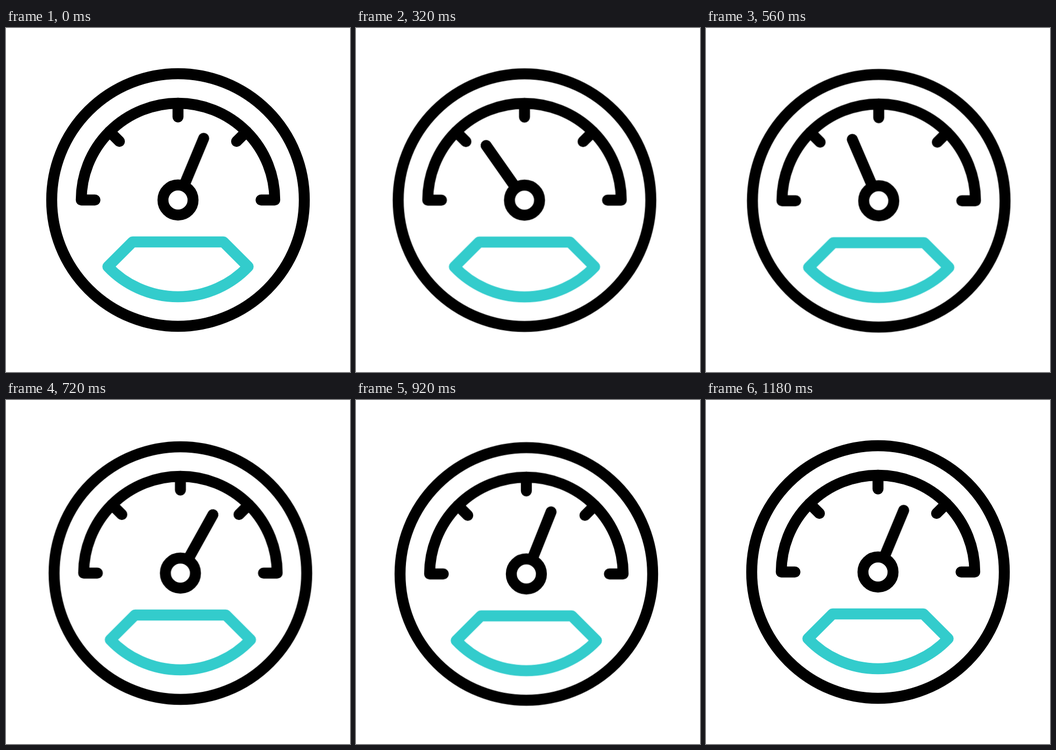
Recreate the animation shown at these times as an HTML page without scripts. Size 640 px wide and 640 px high, loop 1.2 s.

```html
<!DOCTYPE html>
<html lang="en">
<head>
<meta charset="utf-8">
<title>Shaking gauge</title>
<style>
  html, body { margin: 0; width: 100%; height: 100%; overflow: hidden; background: #fff; }
  svg { display: block; width: 100%; height: 100%; }
  .gauge {
    fill: none; stroke: #000; stroke-width: 20.4;
    stroke-linecap: round; stroke-linejoin: round;
  }
  .panel { stroke: #3cc; }
  .shake-x, .shake-y, .needle {
    animation: 1200ms cubic-bezier(.37, 0, .63, 1) infinite;
  }
  .shake-x { animation-name: shake-x; }
  .shake-y { animation-name: shake-y; }
  .needle { animation-name: swing; transform-origin: 320px 320px; }

  @keyframes shake-x {
    0%, 98.33%, 100% { transform: translateX(0); }
    30% { transform: translateX(-6.7px); }
    56.67% { transform: translateX(4.8px); }
    88.33% { transform: translateX(-6.4px); }
  }
  @keyframes shake-y {
    0%, 98.33%, 100% { transform: translateY(0); }
    13.33% { transform: translateY(-2.5px); }
    36.67% { transform: translateY(2px); }
    50% { transform: translateY(1.3px); }
    76.67% { transform: translateY(3.6px); }
    88.33% { transform: translateY(-.3px); }
  }
  @keyframes swing {
    0%, 98.33%, 100% { transform: rotate(22.6deg); }
    20% { transform: rotate(-36deg); }
    28% { transform: rotate(-35deg); }
    40% { transform: rotate(-36deg); }
    63.75% { transform: rotate(33deg); }
    78.33% { transform: rotate(21.4deg); }
  }
</style>
</head>
<body>
<svg viewBox="0 0 640 640">
  <g class="shake-x">
    <g class="gauge shake-y">
      <circle cx="320" cy="320" r="235"/>
      <path d="M165.5 320H140A180 180 0 0 1 500 320H474.5"/>
      <path d="M320 140V165.5M192.7 192.7L211 211M447.3 192.7L429 211"/>
      <path class="needle" d="M320 292V195.6"/>
      <circle cx="320" cy="320" r="28" fill="#fff"/>
      <path class="panel" d="M235.5 398H404.5L450.5 444A180 180 0 0 1 189.5 444Z"/>
    </g>
  </g>
</svg>
</body>
</html>
```
